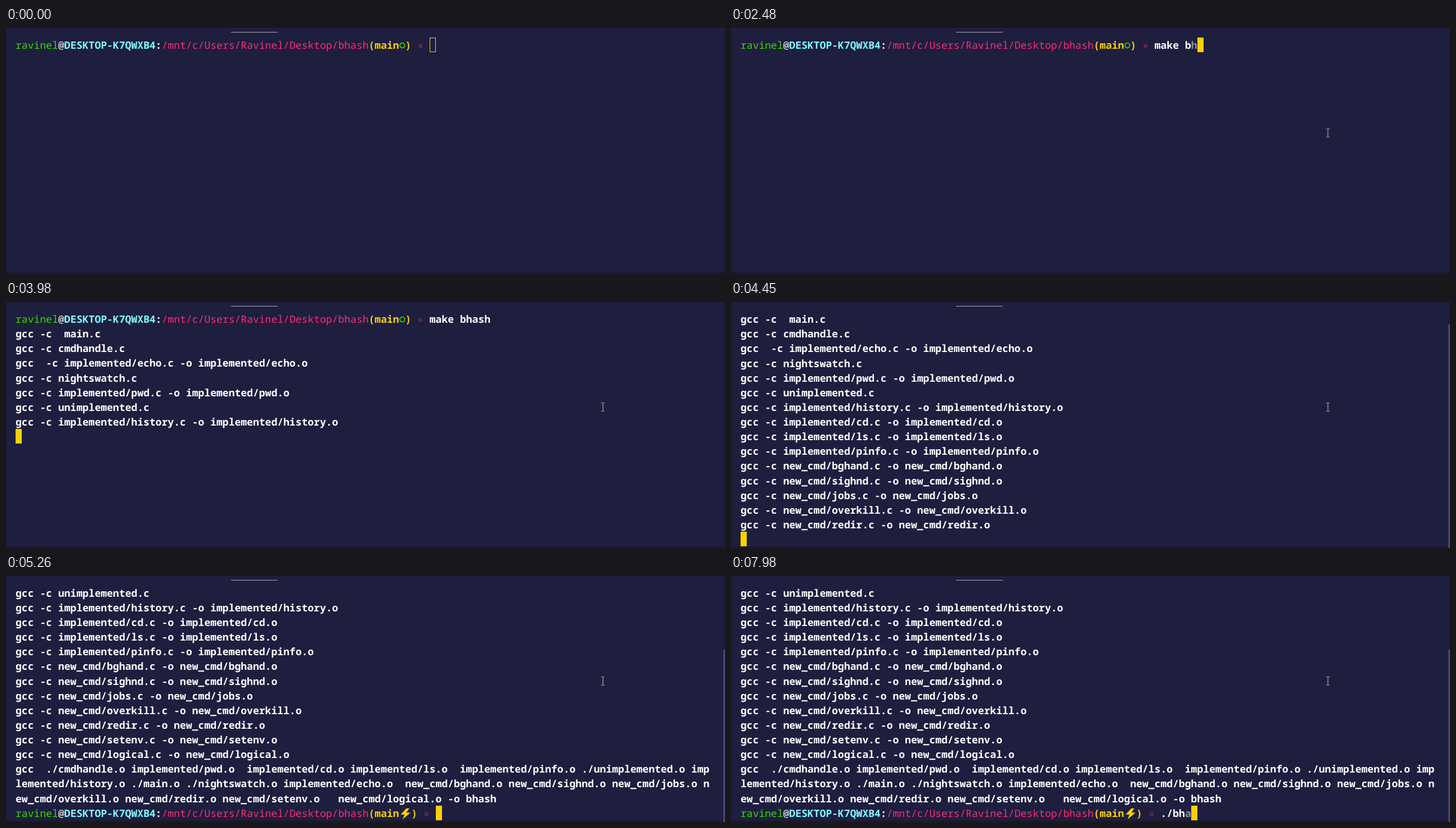
These frames come from a looping animation (1278x438 px, 8000 ms). An HTML page:

```html
<!DOCTYPE html>
<html lang="en">
<head>
<meta charset="utf-8">
<title>Terminal build</title>
<style>
  html, body { margin: 0; width: 100%; height: 100%; overflow: hidden; background: #1e1e3f; }
  body {
    position: relative;
    --col: 10.83px; --row: 26.133px;
    font: 500 18.05px/26.133px "Noto Sans Mono", "DejaVu Sans Mono", monospace;
    color: #fff;
    text-rendering: geometricPrecision;
    font-variant-ligatures: none;
  }
  #tab, #edge, #view, #thumb, #mouse, #caret { position: absolute; }
  #tab { left: 400px; top: 7px; width: 83px; height: 1px; background: #a9a9b4; }
  #edge { left: 0; right: 0; bottom: 0; height: 3px; background: #1a1a36; }
  #view { left: 17px; top: 17px; width: 1250px; height: 419px; overflow: hidden; }
  #lines { position: absolute; left: 0; top: 1px; }
  #lines div { height: var(--row); white-space: pre; font-weight: 600; }
  #lines svg { height: var(--row); vertical-align: top; overflow: visible; }
  #caret { width: 11px; height: 26px; box-sizing: border-box; border: 1px solid #fad000; }
  #thumb { left: 1275px; width: 3px; bottom: 0; background: #4b4676; }
  #mouse { left: -6px; top: -9px; width: 12px; height: 18px; }
  .user { color: #3ad900; font-weight: 400; }
  .at { font-weight: 400; }
  .host { color: #80fcff; }
  .path { color: #ff2c70; font-weight: 400; }
  .git { color: #fad000; }
  .arrow { font-weight: 400; opacity: .62; }
</style>
</head>
<body>
<div id="tab"></div>
<div id="edge"></div>
<div id="view"><div id="lines"></div><div id="caret"></div></div>
<div id="thumb"></div>
<svg id="mouse" viewBox="-6 -9 12 18" fill="none" stroke="#c8c8d2">
  <path d="M-3 -7.5H-1L0 -6.5L1 -7.5H3M0 -6.5V6.5M-3 7.5H-1L0 6.5L1 7.5H3"/>
</svg>
<script>
const LOOP = 8000, COL = 10.83, ROW = 26.133, ROWS = 16;
const $ = id => document.getElementById(id);
const lines = $('lines'), caret = $('caret'), thumb = $('thumb'), mouse = $('mouse');

const circle = `<svg width="${COL}" viewBox="0 0 10.83 26.13">
  <circle cx="5.4" cy="13" r="4.3" fill="none" stroke="#3ad900" stroke-width="1.7"/></svg>`;
const bolt = `<svg width="${2 * COL}" viewBox="0 0 21.66 26.13">
  <path d="M12.5 3.5L2.5 14.5H9.3L6 23L20 11H12.6L18 3.5Z" fill="#fad000"/></svg>`;

const prompt = (mark, color) =>
  '<span class="user">ravinel</span><span class="at">@</span>' +
  '<span class="host">DESKTOP-K7QWXB4</span>:' +
  '<span class="path">/mnt/c/Users/Ravinel/Desktop/bhash</span>' +
  `<span class="git">(main${mark})</span> ` +
  `<span class="arrow" style="color:${color}">»</span> `;

const build = name => `gcc -c ${name}.c -o ${name}.o`;
const inner = name => build('implemented/' + name);
const extra = name => build('new_cmd/' + name);

const output = [
  'gcc -c  main.c',
  'gcc -c cmdhandle.c',
  inner('echo').replace(' ', '  '),
  'gcc -c nightswatch.c',
  inner('pwd'),
  'gcc -c unimplemented.c',
  ...['history', 'cd', 'ls', 'pinfo'].map(inner),
  ...['bghand', 'sighnd', 'jobs', 'overkill', 'redir', 'setenv', 'logical'].map(extra),
  'gcc  ./cmdhandle.o implemented/pwd.o  implemented/cd.o implemented/ls.o  implemented/pinfo.o ./unimplemented.o imp',
  'lemented/history.o ./main.o ./nightswatch.o implemented/echo.o  new_cmd/bghand.o new_cmd/sighnd.o new_cmd/jobs.o n',
  'ew_cmd/overkill.o new_cmd/redir.o new_cmd/setenv.o   new_cmd/logical.o -o bhash'
];

// Time at which each output row is printed
const printed = [3630, 3700, 3770, 3840, 3910, 3980, 3980, 4050, 4130, 4130,
  4240, 4310, 4310, 4380, 4450, 4520, 4590, 4660, 4660, 4660];

const ENTER = 3560, READY = 5260, FOCUS = 670;

// Keystrokes; characters from index `soft` on appear dimmed at first
const commands = [
  { text: 'make bhash', soft: 5, at: [1530, 1600, 1670, 1740, 1880, 2280, 2450, 2620, 2780, 2880] },
  { text: './bha', soft: 2, at: [7240, 7310, 7640, 7810, 7980] }
];

function addRow(html) {
  const row = document.createElement('div');
  row.innerHTML = html;
  lines.append(row);
  return row;
}

function addCommand(row, cmd) {
  cmd.keys = [...cmd.text].map(ch => {
    const key = document.createElement('span');
    key.textContent = ch;
    row.append(key);
    return key;
  });
}

addCommand(addRow(prompt(circle, '#ff2c70')), commands[0]);
const outRows = output.map(addRow);
const lastRow = addRow(prompt(bolt, '#ec3a37'));
addCommand(lastRow, commands[1]);

const show = (el, on) => { el.style.visibility = on ? 'visible' : 'hidden'; };

function type(cmd, t) {
  cmd.keys.forEach((key, i) => {
    const age = t - cmd.at[i];
    key.style.opacity = age < 0 ? 0 : i >= cmd.soft && age < 70 ? .5 : 1;
  });
  return cmd.at.filter(at => t >= at).length;
}

function moveMouse(t) {
  const p = Math.min(7, Math.floor((t - 70) / 75)) / 7;
  const rest = (1 - p) ** 1.5;
  show(mouse, t >= 70);
  mouse.style.transform =
    `translate(${Math.round(1061 + 148 * rest)}px, ${Math.round(187 + 243 * rest)}px)`;
}

function draw(t) {
  const [first, second] = commands.map(cmd => type(cmd, t));
  const count = printed.filter(at => t >= at).length;
  outRows.forEach((row, i) => show(row, i < count));
  show(lastRow, t >= READY);

  const row = t < ENTER ? 0 : count + 1;
  const col = t < ENTER ? 68 + first : t < READY ? 0 : 69 + second;
  const scroll = Math.max(0, row - ROWS + 1);
  lines.style.transform = `translateY(${-scroll * ROW}px)`;
  caret.style.left = Math.round(col * COL) + 'px';
  caret.style.top = Math.round((row - scroll) * ROW) + 'px';
  caret.style.background = t >= FOCUS ? '#fad000' : 'none';

  show(thumb, scroll > 0);
  thumb.style.top = Math.round(15.5 + 422 * scroll / (ROWS + scroll)) + 'px';
  moveMouse(t);
}

const start = performance.now();
function tick() {
  draw((performance.now() - start) % LOOP);
  requestAnimationFrame(tick);
}
tick();
</script>
</body>
</html>
```
